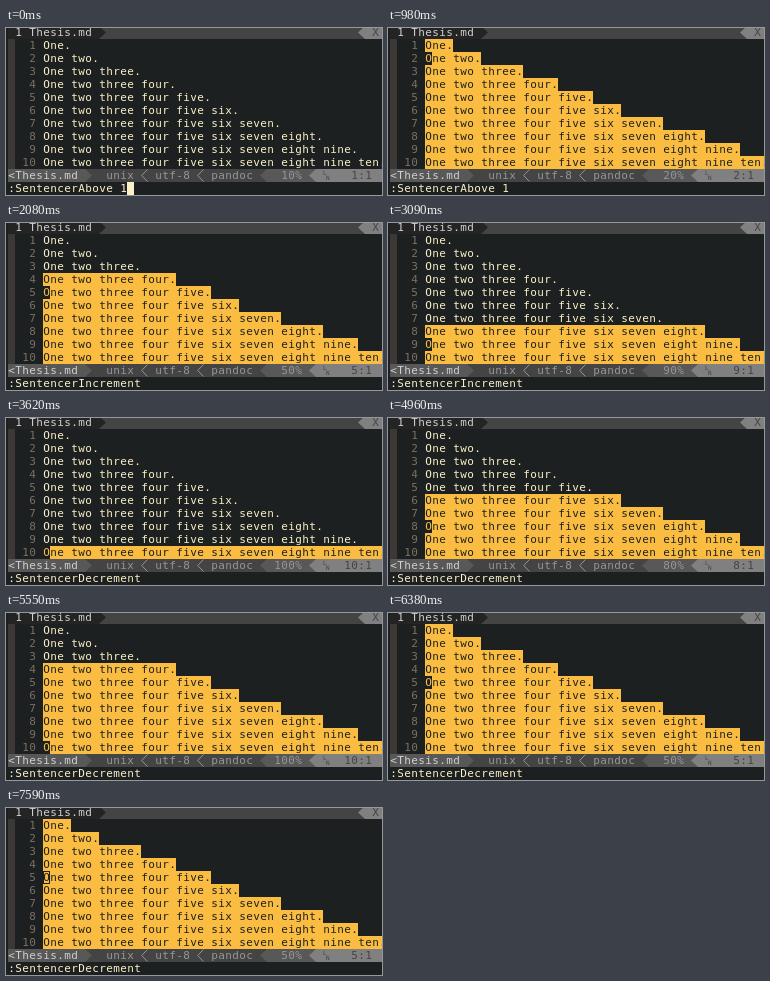
Animation of 376x167 px, one loop 7.69 s. Source, as an HTML page with a canvas:

```html
<!DOCTYPE html>
<html lang="en">
<head>
<meta charset="utf-8">
<title>Sentence highlighter</title>
<style>
html, body { margin: 0; width: 100%; height: 100%; overflow: hidden; background: #1d2021; }
canvas { display: block; }
</style>
</head>
<body>
<canvas id="stage" width="376" height="167"></canvas>
<script>
const ctx = document.getElementById('stage').getContext('2d');
const LOOP = 7690, UNFOCUS = 7590;
const CELL = 7, ROW = 13;
const BG = '#1d2021', FG = '#fbf1c7', MARK = '#fabd41', GUTTER = '#3c3836', NUMBER = '#7c6f64';
const BAR = { dark: '#242424', base: '#444444', mid: '#585858', light: '#808080', dim: '#969696', text: '#d0d0d0' };

const words = 'One two three four five six seven eight nine ten'.split(' ');
const lines = words.map((_, i) => words.slice(0, i + 1).join(' ') + '.');

// Each command changes the minimum sentence length and jumps to the next match, wrapping.
const starts = [980, 1610, 1910, 2080, 2350, 2590, 2820, 3090, 3350, 3620,
                4120, 4450, 4660, 4960, 5230, 5550, 5820, 6080, 6380];
const states = [{ start: 0, min: 99, cursor: 1, command: 'Above 1' }];
starts.forEach((start, i) => {
  const min = i < 10 ? i + 1 : 19 - i;
  const last = states[i].cursor;
  const cursor = last < 10 ? Math.max(last + 1, min) : min;
  const command = i === 0 ? 'Above 1' : i < 9 ? 'Increment' : 'Decrement';
  states.push({ start, min, cursor, command });
});

const colX = col => 2 + col * CELL;
const rowY = row => row * ROW - 2;

function fill(col, row, count, color) {
  ctx.fillStyle = color;
  ctx.fillRect(colX(col), rowY(row), count * CELL, ROW);
}

function text(str, col, row, color) {
  ctx.fillStyle = color;
  ctx.font = '11px "DejaVu Sans Mono", monospace';
  [...str].forEach((ch, i) => ctx.fillText(ch, colX(col + i) + 0.2, rowY(row) + 10));
}

// Solid separator; dir 1 points right, -1 points left.
function arrow(col, row, dir, color) {
  const x = colX(dir > 0 ? col : col + 1), y = rowY(row);
  ctx.fillStyle = color;
  ctx.beginPath();
  ctx.moveTo(x, y);
  ctx.lineTo(x + dir * CELL, y + ROW / 2);
  ctx.lineTo(x, y + ROW);
  ctx.fill();
}

function chevron(col, row, color) {
  const x = colX(col), y = rowY(row);
  ctx.strokeStyle = color;
  ctx.lineWidth = 1;
  ctx.beginPath();
  ctx.moveTo(x + 6.5, y + 0.5);
  ctx.lineTo(x + 0.7, y + ROW / 2);
  ctx.lineTo(x + 6.5, y + ROW - 0.5);
  ctx.stroke();
}

function drawTabs() {
  fill(0, 0, 54, BAR.base);
  fill(0, 0, 13, BAR.dark);
  arrow(13, 0, 1, BAR.dark);
  text('1 Thesis.md', 1, 0, BAR.text);
  arrow(50, 0, -1, BAR.light);
  fill(51, 0, 3, BAR.light);
  text('X', 52, 0, BAR.base);
}

function drawBuffer({ min, cursor }, hollow) {
  lines.forEach((line, i) => {
    const row = i + 1, marked = row >= min;
    fill(0, row, 1, GUTTER);
    text(String(row).padStart(2), 2, row, NUMBER);
    if (marked) fill(5, row, line.length, MARK);
    text(line, 5, row, marked ? BG : FG);
    if (!marked || row !== cursor) return;
    if (hollow) {
      ctx.strokeStyle = BG;
      ctx.lineWidth = 1;
      ctx.strokeRect(colX(5) + 0.5, rowY(row) + 0.5, CELL - 1, ROW - 1);
    } else {
      fill(5, row, 1, BG);
      text('O', 5, row, MARK);
    }
  });
}

function drawStatus({ cursor }) {
  const row = 11;
  fill(0, row, 54, BAR.base);
  fill(0, row, 11, BAR.mid);
  arrow(11, row, 1, BAR.mid);
  text('<Thesis.md', 0, row, BAR.text);
  text('unix   utf-8   pandoc', 14, row, BAR.dim);
  chevron(19, row, BAR.dim);
  chevron(27, row, BAR.dim);
  arrow(36, row, -1, BAR.mid);
  fill(37, row, 7, BAR.mid);
  text(`${cursor * 10}%`.padStart(4), 38, row, BAR.dim);
  arrow(43, row, -1, BAR.light);
  fill(44, row, 10, BAR.light);
  ctx.fillStyle = BAR.base;
  ctx.font = '6px "DejaVu Sans Mono", monospace';
  ctx.fillText('L', colX(45), rowY(row) + 6);
  ctx.fillText('N', colX(45) + 3, rowY(row) + 11);
  text(`${cursor}:1`.padStart(5), 47, row, BAR.base);
}

function draw(now) {
  const t = now % LOOP;
  const state = states.findLast(s => s.start <= t);
  const command = ':Sentencer' + state.command;
  ctx.fillStyle = BG;
  ctx.fillRect(0, 0, 376, 167);
  drawTabs();
  drawBuffer(state, t >= UNFOCUS);
  drawStatus(state);
  text(command, 0, 12, FG);
  if (state === states[0]) fill(command.length, 12, 1, FG);
}

const begin = performance.now();
function tick() {
  draw(performance.now() - begin);
  requestAnimationFrame(tick);
}
tick();
</script>
</body>
</html>
```
